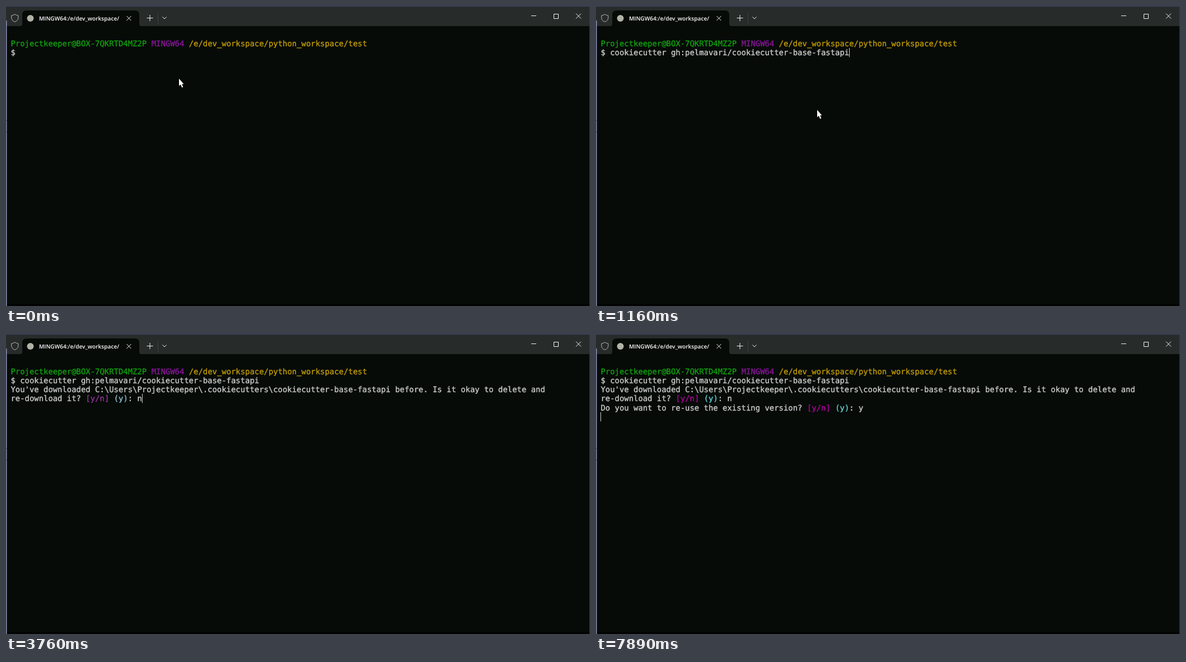
An HTML page that plays this animation: 1043x537 px, repeating every 8 s.

```html
<!DOCTYPE html>
<html lang="en">
<head>
<meta charset="utf-8">
<title>Terminal session</title>
<style>
  html, body { margin: 0; width: 100%; height: 100%; overflow: hidden; background: #060b08; }
  svg { display: block; width: 100%; height: 100%; }

  /* The thin outline gives the glyphs a medium weight. */
  .term text {
    font: 13.91px "DejaVu Sans Mono", monospace;
    text-rendering: geometricPrecision;
    color: #ccc;
    fill: currentColor;
    stroke: currentColor;
    stroke-width: .35;
  }
  .term .user { color: #13a10e; }
  .term .sys { color: #881798; }
  .term .path { color: #c19c00; }
  .title {
    font: 600 10.1px "Open Sans", "Noto Sans", sans-serif;
    text-rendering: geometricPrecision;
    fill: #fff;
  }
  .icons { fill: none; stroke: #f4f5f5; stroke-width: 1; }

  /* One loop is 8 s, so 1% is 80 ms; every change is a hard step. */
  .select, .command, .ask1, .no, .ask2, .yes, .caret, .pointer, .choice, .default {
    animation: 8s step-end infinite;
  }

  .command { animation-name: paste; }
  @keyframes paste {
    0% { opacity: 0; color: #060b08; }
    3.5% { opacity: 1; color: #060b08; }
    13.25%, 100% { opacity: 1; color: #ccc; }
  }
  .select { animation-name: select; }
  @keyframes select {
    0% { opacity: 0; }
    3.5% { opacity: 1; }
    13.25%, 100% { opacity: 0; }
  }

  .ask1 { animation-name: ask1; }
  @keyframes ask1 { 0% { opacity: 0; } 27.125%, 100% { opacity: 1; } }
  .no { animation-name: no; }
  @keyframes no { 0% { opacity: 0; } 47%, 100% { opacity: 1; } }
  .ask2 { animation-name: ask2; }
  @keyframes ask2 { 0% { opacity: 0; } 55.75%, 100% { opacity: 1; } }
  .yes { animation-name: yes; }
  @keyframes yes { 0% { opacity: 0; } 93.875%, 100% { opacity: 1; } }

  .term .choice { animation-name: choice; }
  @keyframes choice { 0% { color: #92349a; } 53.25%, 100% { color: #b4009e; } }
  .term .default { animation-name: default-answer; }
  @keyframes default-answer { 0% { color: #8fc3cc; } 53.25%, 100% { color: #61d6d6; } }

  .caret { animation-name: caret; }
  @keyframes caret {
    0% { opacity: 0; transform: translate(25px, 75px); }
    .875% { opacity: 1; transform: translate(25px, 75px); }
    3.5% { opacity: 1; transform: translate(452px, 75px); }
    18.625% { opacity: 1; transform: translate(8px, 91px); }
    27.125% { opacity: 1; transform: translate(234px, 107px); }
    33.25% { opacity: 0; transform: translate(234px, 107px); }
    40.875% { opacity: 1; transform: translate(234px, 107px); }
    47% { opacity: 1; transform: translate(243px, 107px); }
    53.25% { opacity: 0; transform: translate(243px, 107px); }
    54.5% { opacity: 1; transform: translate(8px, 123px); }
    55.75% { opacity: 1; transform: translate(469px, 123px); }
    64.875% { opacity: 0; transform: translate(469px, 123px); }
    71.625% { opacity: 1; transform: translate(469px, 123px); }
    78.125% { opacity: 0; transform: translate(469px, 123px); }
    86% { opacity: 1; transform: translate(469px, 123px); }
    92.375% { opacity: 0; transform: translate(469px, 123px); }
    93.875% { opacity: 1; transform: translate(477px, 123px); }
    98.625%, 100% { opacity: 1; transform: translate(8px, 140px); }
  }

  .pointer { animation-name: pointer; }
  @keyframes pointer {
    0% { opacity: 1; transform: translate(309px, 130px); }
    5.875% { opacity: 1; transform: translate(331px, 146px); }
    7.25% { opacity: 1; transform: translate(360px, 167px); }
    8.5% { opacity: 1; transform: translate(380px, 179px); }
    9.375% { opacity: 1; transform: translate(390px, 184px); }
    11% { opacity: 1; transform: translate(395px, 186px); }
    18.625% { opacity: 0; transform: translate(395px, 186px); }
    23.625% { opacity: 1; transform: translate(395px, 186px); }
    47%, 100% { opacity: 0; transform: translate(395px, 186px); }
  }
</style>
</head>
<body>
<svg viewBox="0 0 1043 537">
  <!-- Window -->
  <rect width="1043" height="537" fill="#060b08"/>
  <rect y="533" width="1043" height="4" fill="#020403"/>
  <rect width="1043" height="36" fill="#272c2a"/>
  <rect width="1043" height="1" fill="#45466c"/>
  <rect y="26" width="1.5" height="511" fill="#8c90b6"/>
  <rect x="1042" width="1" height="537" fill="#3a3d4c"/>
  <path d="M0 205h2M0 225h2" stroke="#30334a"/>

  <!-- Tab bar -->
  <path d="M25 36q4 0 4-4V16q0-8 8-8H230q8 0 8 8V32q0 4 4 4z" fill="#060b08"/>
  <circle cx="43.5" cy="22" r="6" fill="#b0b3a5"/>
  <text class="title" x="59" y="26">MINGW64:/e/dev_workspace/</text>
  <g class="icons">
    <path d="M15.8 14.8q3 2.2 6 2.2v4q0 5-6 7.5q-6-2.5-6-7.5v-4q3 0 6-2.2z" stroke="#b4b8b6"/>
    <path d="M215.5 18l8 8m0-8l-8 8"/>
    <path d="M251.5 21.5h11M257 16v11"/>
    <path d="M271.5 12v20" stroke="#3d4240"/>
    <path d="M279.5 19.5l3.5 3.5 3.5-3.5"/>
    <path d="M938 17.5h9"/>
    <path d="M978.5 14.5h8v8h-8z"/>
    <path d="M1018 13.5l9 9m0-9l-9 9"/>
  </g>

  <!-- Terminal text -->
  <rect class="select" x="25" y="75" width="427.5" height="16" fill="#ccc"/>
  <g class="term" transform="translate(8.4 71.6)">
    <text class="user">Projectkeeper@BOX-7QKRTD4MZ2P</text>
    <text class="sys" x="251.25">MINGW64</text>
    <text class="path" x="318.25">/e/dev_workspace/python_workspace/test</text>

    <text y="16.25">$</text>
    <text class="command" x="16.75" y="16.25">cookiecutter gh:pelmavari/cookiecutter-base-fastapi</text>

    <g class="ask1">
      <text y="32.5">You've downloaded C:\Users\Projectkeeper\.cookiecutters\cookiecutter-base-fastapi before. Is it okay to delete and</text>
      <text y="48.75">re-download it?</text>
      <text class="choice" x="134" y="48.75">[y/n]</text>
      <text class="default" x="184.25" y="48.75">(y)</text>
      <text x="209.4" y="48.75">:</text>
    </g>
    <text class="no" x="226.1" y="48.75">n</text>

    <g class="ask2">
      <text y="65">Do you want to re-use the existing version?</text>
      <text class="choice" x="368.5" y="65">[y/n]</text>
      <text class="default" x="418.75" y="65">(y)</text>
      <text x="443.9" y="65">:</text>
    </g>
    <text class="yes" x="460.6" y="65">y</text>
  </g>

  <rect class="caret" width="1" height="16.5" fill="#d0d2d0"/>
  <path class="pointer" d="M0 0V13l2.9-2.6 2.4 5.6 2-.9-2.3-5.3H8.5z" fill="#fff"/>
</svg>
</body>
</html>
```
